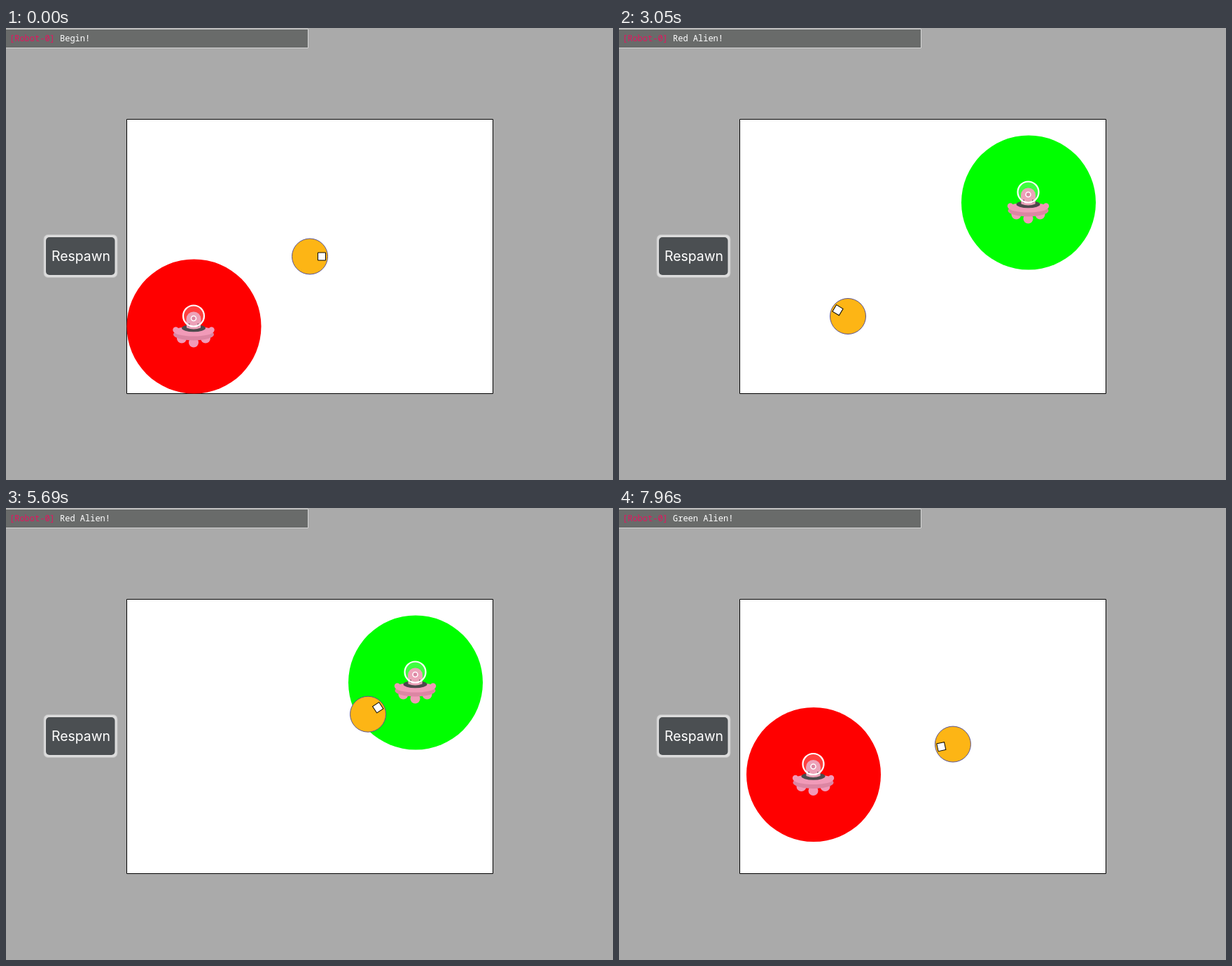
These frames come from a looping animation (867x646 px, 7.99 s). An HTML page with a canvas:

```html
<!DOCTYPE html>
<html lang="en">
<head>
<meta charset="utf-8">
<title>Robot and alien</title>
<style>
  html, body { margin: 0; width: 100%; height: 100%; overflow: hidden; background: #aaa; }
  canvas { display: block; }
</style>
</head>
<body>
<canvas id="stage" width="867" height="646"></canvas>
<script>
const ctx = document.getElementById('stage').getContext('2d');
const LOOP = 7990;
const TURN_DELAY = 200;
const TURN_RATE = 0.12; // degrees per ms
const OLD_LINE_TIME = 400;

// Each leg: the robot turns towards the alien and drives until it reaches it.
const legs = [
  { start: 0, heading: 0, alien: [268.5, 426.5], color: '#f00', message: 'Begin!' },
  { start: 2475, heading: 166, alien: [585, 249.5], color: '#0f0', message: 'Red Alien!' },
  { start: 5720, heading: 326, alien: [278, 381], color: '#f00', message: 'Green Alien!' }
];

// Time, x, y
const path = [
  [0, 434, 326.5], [780, 434, 326.5], [905, 433.6, 333], [1400, 411, 376],
  [1690, 389, 393], [2475, 331, 411], [2560, 327, 412], [3580, 327, 412],
  [3980, 344, 383], [4080, 350, 377], [4900, 436, 331], [5690, 517, 294.7],
  [5800, 523, 291], [7170, 523, 291], [7360, 518.5, 302], [7960, 477, 337.5],
  [7990, 474, 338.8]
];

function slope(i, axis) {
  if (i === 0 || i === path.length - 1) return 0;
  const rate = (a, b) => (b[axis] - a[axis]) / (b[0] - a[0]);
  const before = rate(path[i - 1], path[i]);
  const after = rate(path[i], path[i + 1]);
  return before * after > 0 ? 2 * before * after / (before + after) : 0;
}

// Monotone cubic through the path points
function along(t, axis) {
  let i = 0;
  while (i < path.length - 2 && t >= path[i + 1][0]) i++;
  const a = path[i], b = path[i + 1];
  const span = b[0] - a[0];
  const u = (t - a[0]) / span;
  const v = 1 - u;
  return a[axis] * (1 + 2 * u) * v * v + b[axis] * u * u * (3 - 2 * u) +
    span * (slope(i, axis) * u * v * v - slope(i + 1, axis) * u * u * v);
}

function headingAt(t, leg, x, y) {
  const aim = Math.atan2(leg.alien[1] - y, leg.alien[0] - x) * 180 / Math.PI;
  const gap = ((aim - leg.heading) % 360 + 360) % 360;
  const turned = Math.max(0, t - leg.start - TURN_DELAY) * TURN_RATE;
  return (leg.heading + Math.min(gap, turned)) * Math.PI / 180;
}

function ellipse(x, y, rx, ry, fill, stroke, width = 1) {
  ctx.beginPath();
  ctx.ellipse(x, y, rx, ry, 0, 0, 2 * Math.PI);
  paint(fill, stroke, width);
}

function disc(x, y, r, fill, stroke, width) {
  ellipse(x, y, r, r, fill, stroke, width);
}

function box(x, y, w, h, radius, fill, stroke) {
  ctx.beginPath();
  ctx.roundRect(x, y, w, h, radius);
  paint(fill, stroke, 1);
}

function paint(fill, stroke, width) {
  if (fill) {
    ctx.fillStyle = fill;
    ctx.fill();
  }
  if (stroke) {
    ctx.strokeStyle = stroke;
    ctx.lineWidth = width;
    ctx.stroke();
  }
}

function write(text, x, y, font, color, align = 'left') {
  ctx.font = font;
  ctx.fillStyle = color;
  ctx.textAlign = align;
  ctx.fillText(text, x, y);
}

function drawAlien({ alien: [x, y], color }) {
  const pink = '#f19ab8', shade = '#dc86a3';
  disc(x, y, 96, color);
  ctx.save();
  ctx.translate(x - 0.5, y);

  disc(0, -15, 15, 'rgba(255,255,255,.25)');
  for (const side of [-1, 1]) {
    disc(side * 17, 17, 7, pink);
    disc(side * 25.5, 5, 4.2, pink);
  }
  disc(0, 23, 7, pink);
  ellipse(0, 11.5, 29, 8.5, shade);
  ellipse(0, 7, 28.5, 7, pink);
  ellipse(0, 2.5, 17, 5.2, '#4c4a4c');

  ctx.beginPath();
  ctx.arc(0, -10.5, 10.5, Math.PI, 0);
  ctx.lineTo(10, 2);
  ctx.quadraticCurveTo(0, 6, -10, 2);
  ctx.closePath();
  paint('#eda2b9');
  disc(0, -11.5, 3.5, shade, '#fff', 1.5);
  for (const side of [-1, 1]) {
    ctx.fillStyle = '#6b4653';
    ctx.fillRect(side * 6.5 - 1, -4, 2, 4);
  }
  disc(0, -15, 15, null, '#fff', 2.2);
  ctx.restore();
}

function drawRobot(x, y, heading) {
  ctx.save();
  ctx.translate(x, y);
  disc(0, 0, 25.5, '#fdb515', '#5a5390');
  ctx.rotate(heading);
  box(11.5, -5.5, 11, 11, 0, '#fff', '#000');
  ctx.restore();
}

function drawLog(t, index) {
  const lines = [legs[index].message];
  if (index && t - legs[index].start < OLD_LINE_TIME) lines.unshift(legs[index - 1].message);
  const font = '12px "Noto Sans Mono", monospace';
  box(-1.5, 1.5, 433, 9 + 18 * lines.length, 0, '#696b6a', '#d6d6d6');
  lines.forEach((line, i) => {
    const y = 19 + 18 * i;
    write('[Robot-0]', 5, y, font, '#e5145f');
    write(line, 77, y, font, '#fff');
  });
}

function drawButton() {
  box(54, 295.5, 105, 61, 6, '#dcdcdc', '#c2c2c2');
  box(57, 299, 98.5, 54, 5, '#4b4f52');
  write('Respawn', 107, 333, '19.4px Inter, sans-serif', '#fff', 'center');
}

function draw(t) {
  const index = legs.findLastIndex(leg => t >= leg.start);
  const leg = legs[index];
  const x = along(t, 1), y = along(t, 2);
  ctx.fillStyle = '#aaa';
  ctx.fillRect(0, 0, 867, 646);
  box(172.5, 130.5, 523, 392, 0, '#fff', '#000');
  drawAlien(leg);
  drawRobot(x, y, headingAt(t, leg, x, y));
  drawLog(t, index);
  drawButton();
}

const begin = performance.now();
function frame() {
  draw((performance.now() - begin) % LOOP);
  requestAnimationFrame(frame);
}
frame();
</script>
</body>
</html>
```
